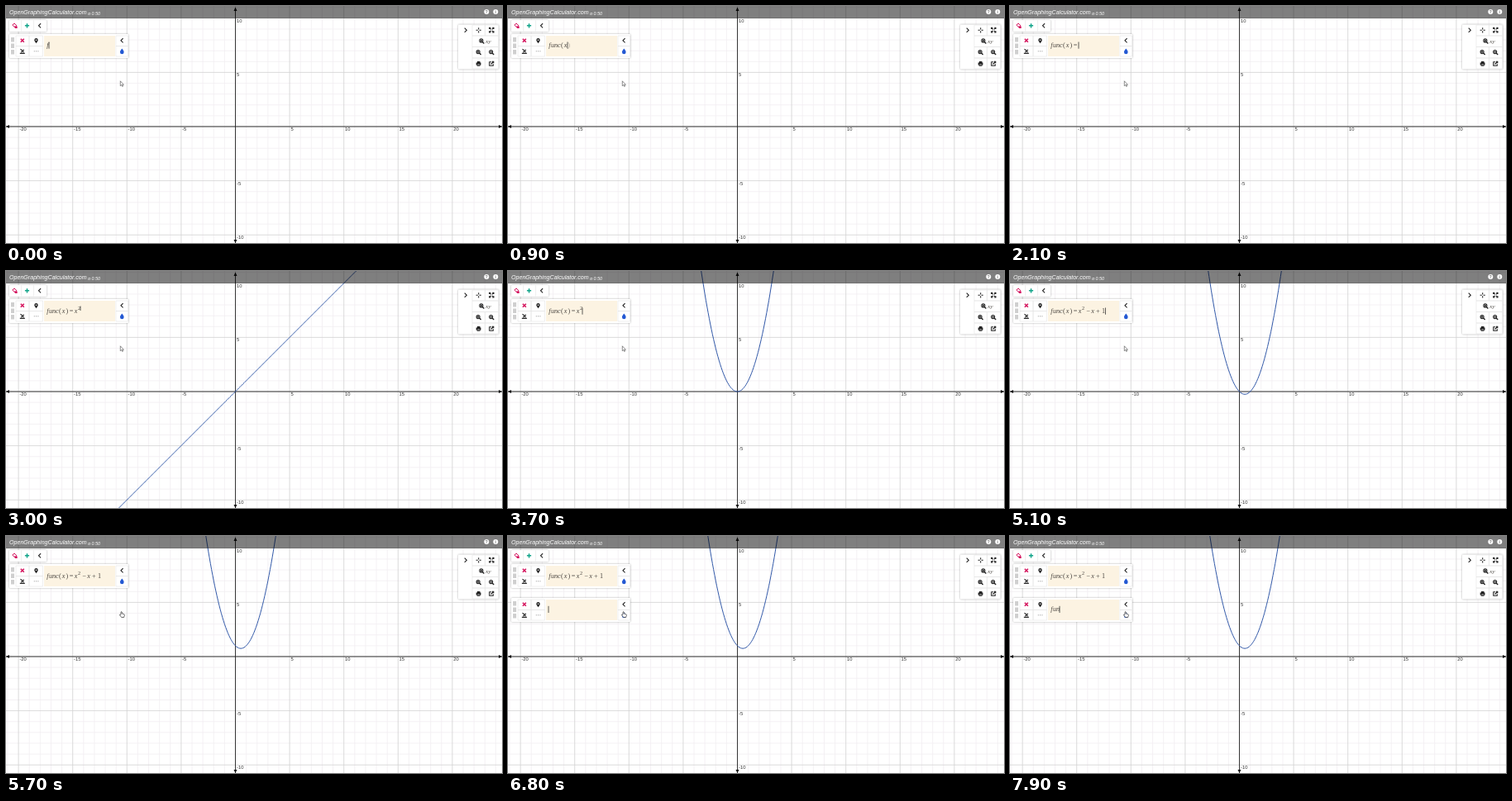
An HTML page for the animation above (8000 ms loop, 600 by 287 pixels).

```html
<!DOCTYPE html>
<html lang="en">
<head>
<meta charset="utf-8">
<title>Graphing calculator</title>
<style>
html, body { margin: 0; width: 100%; height: 100%; overflow: hidden; background: #fff; }
svg { display: block; width: 600px; height: 287px; font-family: "Liberation Sans", Arial, sans-serif; }
.panel { fill: #fff; filter: drop-shadow(0 .3px .8px #0005); }
.cell { fill: #fff; stroke: #e4e4e4; stroke-width: .6; }
.math { font: italic 8.2px "Liberation Serif", "Times New Roman", serif; fill: #4a4641; }
.math .up { font-style: normal; }
.icon { fill: none; stroke: #222; stroke-width: 1.1; }
.caret { stroke: #333; stroke-width: .8; }
.axis { stroke: #222; stroke-width: .9; }
</style>
</head>
<body>
<svg viewBox="0 0 600 287">
  <defs>
    <path id="left" class="icon" d="M1.3-2.6-1.3 0 1.3 2.6"/>
    <path id="right" class="icon" d="M-1.3-2.6 1.3 0-1.3 2.6"/>
    <g id="lens" class="icon"><circle cx="-.6" cy="-.6" r="2"/><path d="M.9.9 2.9 2.9" stroke-width="1.4"/></g>
    <g id="row">
      <rect class="panel" x="4" y="34" width="144" height="29" rx="1"/>
      <path d="M6 38h4v5.5h-4zM6 45.5h4v5.5h-4zM6 53h4v5.5h-4z" fill="#cfcfcf"/>
      <path class="cell" d="M12 36h16v12.5h-16zM28 36h16.500v12.500h-16.500zM12 48.500h16v12.500h-16zM28 48.500h16.500v12.500h-16.500zM133 36h14.500v12.500h-14.500zM133 48.500h14.500v12.500h-14.500z"/>
      <rect x="46" y="36" width="86" height="25" fill="#fcf3e2"/>
      <path d="M17.800 39.800 21.800 43.800M21.800 39.800 17.800 43.800" stroke="#d5145f" stroke-width="1.600"/>
      <path d="M36.500 45.200C34.500 42.500 34.300 42 34.300 41.300a2.200 2.200 0 0 1 4.400 0C38.700 42 38.500 42.500 36.500 45.200z" fill="#222"/>
      <circle cx="36.500" cy="41.200" r=".8" fill="#fff"/>
      <path class="icon" d="M16.800 57.400h6M17.500 52.200 21.500 56M21.700 53 18.300 56" />
      <path d="M33.800 54.800h5.600" stroke="#888" stroke-width=".9" stroke-dasharray="1 1.300"/>
      <use href="#left" x="140.300" y="41.800"/>
      <path d="M140.300 51.600C142.600 54.500 142.600 55 142.600 56a2.300 2.300 0 0 1-4.600 0C138 55 138 54.500 140.300 51.600z" fill="#2459d3"/>
    </g>
  </defs>

  <rect width="600" height="287" fill="#fff"/>
  <path id="minor" stroke="#f2eef2" stroke-width=".8"/>
  <path id="major" stroke="#d2d2d2" stroke-width=".8"/>
  <path class="axis" d="M0 146H600M277.500 2V287"/>
  <path d="M0 146l4-2v4zM600 146l-4-2v4zM277.500 1.500l-2 4.500h4zM277.500 287l-2-4h4z" fill="#111"/>
  <g id="labels" font-size="5.800" fill="#333"></g>
  <path id="curve" fill="none" stroke="#3158a8" stroke-width="1"/>

  <rect width="600" height="15" fill="#000" fill-opacity=".5"/>
  <g fill="#fff" font-style="italic">
    <text x="4" y="10.300" font-size="7.100">OpenGraphingCalculator.com</text>
    <text x="99" y="11.300" font-size="5.400">α 0.50</text>
  </g>
  <circle cx="581.300" cy="7" r="3" fill="#fff"/>
  <circle cx="592.300" cy="7" r="3" fill="#fff"/>
  <g font-size="5" font-weight="bold" fill="#777" text-anchor="middle">
    <text x="581.300" y="8.800">?</text><text x="592.300" y="8.800">i</text>
  </g>

  <rect class="panel" x="4" y="17" width="45" height="14" rx="1"/>
  <path class="cell" d="M18.500 17.500v13M33.500 17.500v13"/>
  <path d="M7.800 23.200l2.200-2.200 3 2.800-2.200 2z" fill="#fff" stroke="#d5145f"/>
  <path d="M10 24.500h3.600v2.600h-2.600z" fill="#d5145f"/>
  <path d="M25.500 21.200v5.200M22.900 23.800h5.200" stroke="#13a58a" stroke-width="1.500"/>
  <use href="#left" x="40.800" y="23.800"/>

  <rect class="panel" x="547" y="22.500" width="49" height="54" rx="1"/>
  <path class="cell" d="M564 23h15.500v13h-15.500zM579.500 23h16v13h-16zM564 36h31.500v13.500h-31.500zM564 49.500h15.500v13.500h-15.500zM579.500 49.500h16v13.500h-16zM564 63h15.500v13h-15.500zM579.500 63h16v13h-16z"/>
  <use href="#right" x="556" y="29.300"/>
  <path class="icon" d="M571.700 26.200v2.200M571.700 30.200v2.200M568.600 29.300h2.200M572.600 29.300h2.200"/>
  <path class="icon" d="M584.700 28v-1.700h1.700M588.300 26.300h1.700v1.700M590 30.300v1.700h-1.700M586.400 32h-1.700v-1.700M585 26.600l1.800 1.800M589.700 26.600l-1.800 1.800M585 31.700l1.800-1.800M589.700 31.700l-1.800-1.800" stroke-width=".9"/>
  <use href="#lens" x="575.500" y="42.500"/>
  <text class="math" x="580.300" y="44.800" style="font-size:7px">xy</text>
  <use href="#lens" x="571.700" y="56.200"/>
  <use href="#lens" x="587.300" y="56.200"/>
  <path class="icon" d="M573.900 41.900h2M574.900 40.900v2M570.100 55.600h2M571.100 54.600v2M585.700 55.600h2" stroke-width=".6"/>
  <path d="M570 67h3.500v1.500h1v3h-1v1.300h-3.800v-1.300h-1v-3h1.300z" fill="#222"/>
  <path d="M570.300 71h2.700" stroke="#fff" stroke-width=".7"/>
  <path class="icon" d="M587 67.700h-2.200v4.600h4.500v-2M586.600 70.500l3-3M587.800 67.300h2v2" stroke-width=".9"/>

  <use href="#row"/>
  <g id="first" class="math"></g>
  <g id="second"><use href="#row" y="41"/><g id="secondMath" class="math"></g></g>

  <path id="arrow" d="M138.300 90.800v6l1.400-1.200 1 2 .9-.5-1-1.800h1.800z" fill="#fff" stroke="#444" stroke-width=".6"/>
  <path id="hand" d="M139 95.200v-3.200q.7-1 1.300 0v2l2.600.7q.6.300.4 1.300l-.6 2.500h-3l-2.200-2.800q0-1 .8-.6z" fill="#fff" stroke="#333" stroke-width=".7"/>
</svg>
<script>
const $ = id => document.getElementById(id);
const X0 = 277.5, Y0 = 146, UNIT = 13.12;
const px = x => X0 + x * UNIT, py = y => Y0 - y * UNIT;

// Grid and axis labels
const grid = { minor: "", major: "" };
let labels = "";
for (let i = -22; i <= 25; i++) {
  const kind = i % 5 ? "minor" : "major";
  grid[kind] += `M${px(i)} 0V287`;
  if (Math.abs(i) < 12) grid[kind] += `M0 ${py(i)}H600`;
  if (i % 5 || !i) continue;
  if (i < 25) labels += `<text x="${px(i) + 1.3}" y="151.300">${i}</text>`;
  if (Math.abs(i) <= 10) labels += `<text x="279" y="${py(i) + 5}">${i}</text>`;
}
$("minor").setAttribute("d", grid.minor);
$("major").setAttribute("d", grid.major);
$("labels").innerHTML = labels;

// Typed characters: glyph, left edge, caret position after it
const glyphs = [
  ["f", 49.3, 52], ["u", 52, 56], ["n", 56, 60], ["c", 60, 64], ["(", 64, 67.7],
  ["x", 67.8, 72], [")", 72.5, 76], ["=", 76.8, 83], ["x", 82.7, 87], ["2", 87, 90],
  ["−", 92.5, 98], ["x", 98.2, 102.3], ["+", 104, 109.5], ["1", 111, 115.5]
];

// Time, characters shown, caret opacity
const firstKeys = [
  [0, 1, 1], [100, 2, 1], [200, 3, 1], [300, 4, 1], [700, 5, 1], [900, 6, 1],
  [1100, 6, 0], [1300, 7, 1], [1600, 8, 1], [1800, 8, 0], [2100, 8, 1], [2400, 9, 1],
  [3000, 10, 1], [3800, 10, 0], [4000, 10, 1], [4200, 11, 1], [4300, 12, 1],
  [4700, 13, 1], [5100, 14, 1], [5400, 14, 0]
];
const secondKeys = [
  [0, 0, 1], [6300, 0, .5], [6400, 0, 0], [6700, 0, .5], [6800, 0, 1], [7200, 0, .5],
  [7300, 0, 0], [7600, 0, 1], [7700, 1, 1], [7800, 2, 1], [7900, 3, 1]
];
const plots = [
  [0, null], [2500, x => x], [3200, x => x * x],
  [4400, x => x * x - x], [5200, x => x * x - x + 1]
];
const at = (keys, t) => keys.findLast(key => key[0] <= t);

function mathMarkup(count, caret, base, raised) {
  const glyph = ([ch, x], i, extra = "") => {
    const up = /[a-z]/.test(ch) ? "" : "up", power = i === 9;
    return `<text class="${up}" x="${x}" y="${power ? base - 4 : base}"
      ${power ? 'style="font-size:6.2px"' : ""} ${extra}>${ch}</text>`;
  };
  let out = glyphs.slice(0, count).map((g, i) => glyph(g, i)).join("");
  if (count === 5 || count === 6) out += glyph([")", count === 5 ? 69.5 : 72.5], 6, 'opacity=".4"');
  const x = count ? glyphs[count - 1][2] : 49;
  const [top, bottom] = raised ? [base - 8.5, base - 3] : [base - 6.5, base + 1.7];
  return out + `<path class="caret" opacity="${caret}" d="M${x} ${top}V${bottom}"/>`;
}

function curvePath(f) {
  if (!f) return "";
  let d = "";
  for (let x = -22; x <= 25; x += .1) d += `${d ? "L" : "M"}${px(x).toFixed(2)} ${py(f(x)).toFixed(2)}`;
  return d;
}

function draw(t) {
  const [, count, caret] = at(firstKeys, t);
  $("first").innerHTML = mathMarkup(count, caret, count > 9 ? 51 : 50, count === 10 && t < 3500);
  $("curve").setAttribute("d", curvePath(at(plots, t)[1]));

  const [, count2, caret2] = at(secondKeys, t);
  const enter = Math.min(1, Math.max(0, (t - 5700) / 300));
  $("second").setAttribute("opacity", enter);
  $("second").setAttribute("transform", `translate(0 ${27 * (1 - enter)})`);
  $("secondMath").innerHTML = mathMarkup(count2, caret2, 91.3);

  $("arrow").setAttribute("opacity", t < 5500 ? 1 : 0);
  $("hand").setAttribute("opacity", t < 5500 ? 0 : 1);
}

function tick() {
  draw(Math.floor(performance.now() % 8000 / 100) * 100);
  requestAnimationFrame(tick);
}
tick();
</script>
</body>
</html>
```
